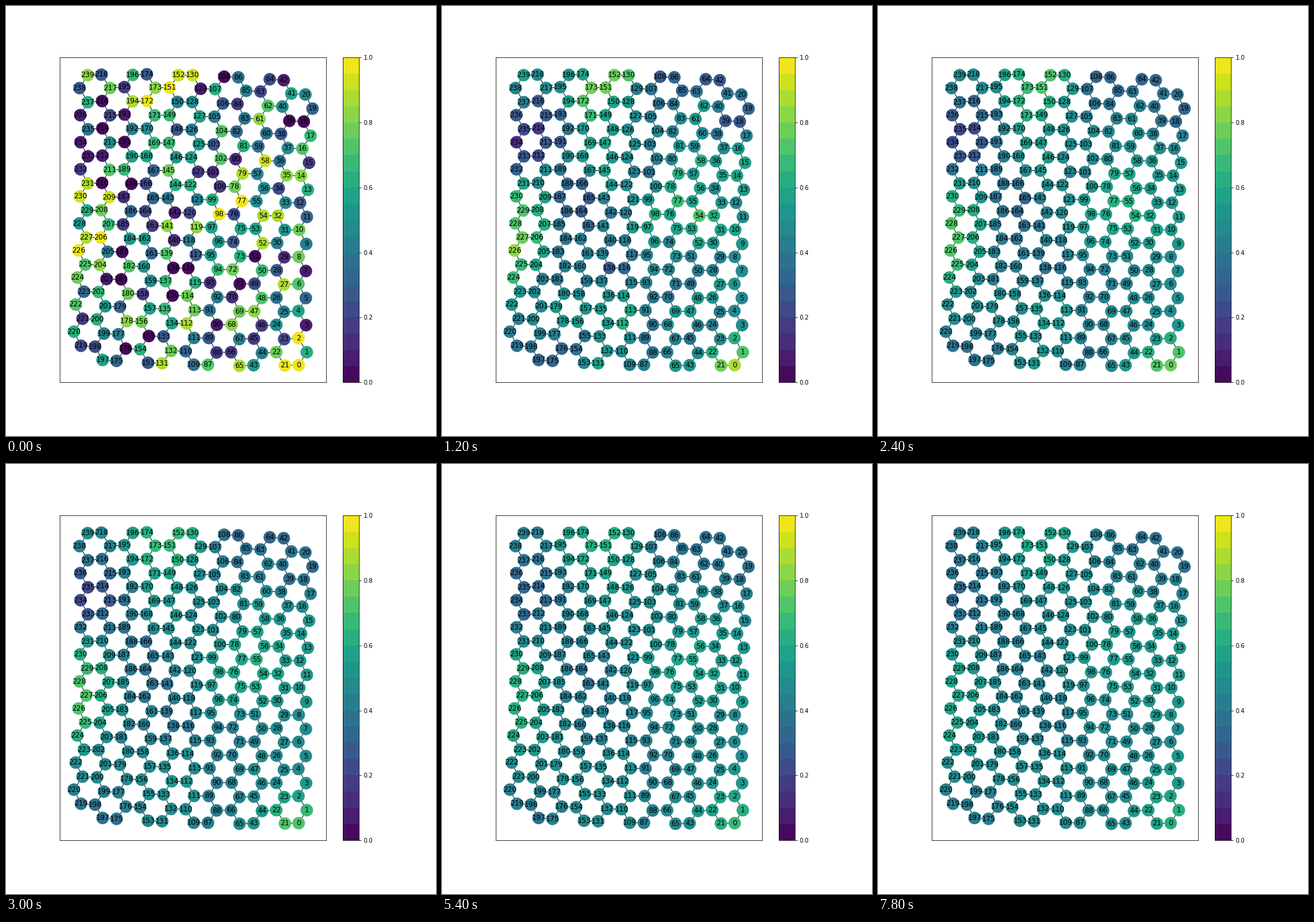
A matplotlib script that plays this animation: 720 px wide and 720 px high, repeating every 8 s.

```python
import numpy as np
import matplotlib.pyplot as plt
from matplotlib.animation import FuncAnimation
from matplotlib.cm import ScalarMappable
from matplotlib.collections import LineCollection
from matplotlib.colors import ListedColormap

SIZE, DPI = 720, 72
TICK = 200          # ms per drawn frame
HOLD = 3            # drawn frames per averaging step
FRAMES = 40
COLS, ROWS = 11, 22

# Warm and cool regions of the starting field: x, y, strength
SPOTS = [
    (125, 380, 0.42), (265, 120, 0.36), (395, 320, 0.28), (490, 600, 0.30),
    (160, 215, -0.38), (225, 400, -0.28), (505, 180, -0.24),
    (385, 130, -0.20), (170, 592, -0.22), (400, 495, -0.14),
    (310, 300, -0.14),
]
SPREAD = 38


def build_lattice():
    """Cells (column, row) in label order, and the edges between them."""
    missing = ((0, ROWS - 1), (COLS - 1, 0))
    cells = [(c, r) for c in range(COLS) for r in range(ROWS)
             if (c, r) not in missing]
    index = {cell: i for i, cell in enumerate(cells)}
    edges = []
    for (c, r), i in index.items():
        if (c, r + 1) in index:
            edges.append((i, index[c, r + 1]))
        if (c + r) % 2 == 0 and (c + 1, r) in index:
            edges.append((i, index[c + 1, r]))
    return np.array(cells), edges


def place(cells):
    """Pixel positions: a gently fanned honeycomb of zigzag columns."""
    c, r = cells.T
    k = c - 5
    v = (r - 10.5) / 9.5
    side = np.where((c + r) % 2, 1, -1)
    x = 313.4 - 37.1 * k + 0.012 * k**3 + 5.7 * v - 1.02 * k * v**2
    x += side * (6.1 + 0.8 * v**4)
    y = 369.9 - 1.3 * k + 0.009 * k**3 - (23.18 - 0.021 * k**2) * (r - 10)
    y += side * 0.5
    outer = (abs(k) < 5) & ((r == 0) | (r == ROWS - 1))
    y += np.where(outer, 1.5 * np.sign(v), 0)
    return np.column_stack([x, y])


def averaging_matrix(edges, count):
    """Each node takes the mean of itself and its neighbours."""
    mix = np.eye(count)
    for a, b in edges:
        mix[a, b] = mix[b, a] = 1
    return mix / mix.sum(axis=1, keepdims=True)


def start_values(points, mix):
    """Fine random noise on top of a smooth field of spots."""
    noise = np.random.default_rng(4).uniform(-0.5, 0.5, len(points))
    noise -= np.linalg.matrix_power(mix, 6) @ noise
    field = np.full(len(points), 0.49)
    for x, y, strength in SPOTS:
        dist2 = ((points - (x, y)) ** 2).sum(axis=1)
        field += strength * np.exp(-dist2 / (2 * SPREAD**2))
    return np.clip(field + noise, 0, 1)


cells, edges = build_lattice()
points = place(cells)
mix = averaging_matrix(edges, len(cells))
history = [start_values(points, mix)]
for _ in range(FRAMES // HOLD):
    history.append(mix @ history[-1])

plt.rcParams["font.family"] = "DejaVu Sans"
fig = plt.figure(figsize=(SIZE / DPI, SIZE / DPI), dpi=DPI, facecolor="white")
cmap = ListedColormap(plt.get_cmap("viridis")((np.arange(20) + 0.5) / 20))

ax = fig.add_axes([0.125, 0.125, 0.62, 0.755])
ax.set(xlim=(90, 536.4), ylim=(630, 86.4), xticks=[], yticks=[])
ax.add_collection(LineCollection([points[list(e)] for e in edges],
                                 colors="black", linewidths=1, zorder=1))
dots = ax.scatter(points[:, 0], points[:, 1], s=400, c=history[0], cmap=cmap,
                  vmin=0, vmax=1, linewidths=1, zorder=2)
for i, (x, y) in enumerate(points):
    ax.text(x, y, str(i), fontsize=12, ha="center", va="center", zorder=3)

bar_ax = fig.add_axes([564.3 / SIZE, 0.125, 0.755 / 20, 0.755])
fig.colorbar(ScalarMappable(plt.Normalize(0, 1), cmap), cax=bar_ax,
             ticks=np.linspace(0, 1, 6))


def update(frame):
    dots.set_array(history[frame // HOLD])
    return [dots]


anim = FuncAnimation(fig, update, frames=FRAMES, interval=TICK, repeat=True,
                     repeat_delay=0, blit=False)
plt.show()
```
